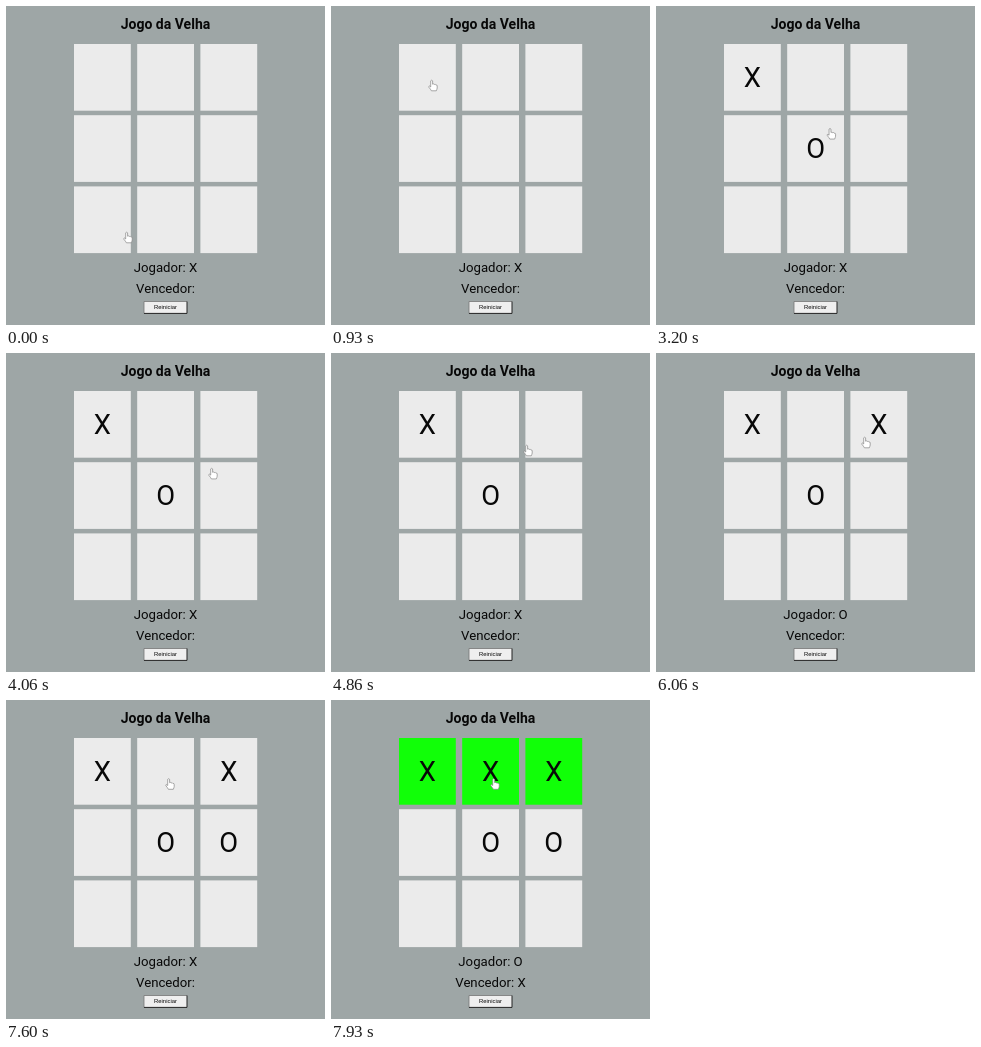
An HTML page for the animation above (8 s loop, 319 by 319 pixels).

```html
<!DOCTYPE html>
<html lang="pt-BR">
<head>
<meta charset="utf-8">
<title>Jogo da Velha</title>
<style>
  html, body { margin: 0; width: 100%; height: 100%; overflow: hidden; background: #9ea6a6; }
  svg { display: block; width: 100%; height: 100%; }
  text { font-family: Roboto, sans-serif; text-anchor: middle; fill: #080808; }
  .title { font-size: 14px; font-weight: 700; }
  .label { font-size: 13.2px; }
  .mark { font-size: 27.4px; }
  .button-text { font: 5.9px "Liberation Sans", Arial, sans-serif; }
</style>
</head>
<body>
<svg viewBox="0 0 319 319">
  <text class="title" x="159.5" y="22.9">Jogo da Velha</text>
  <g id="board"></g>
  <text class="label" id="player" x="159.5" y="266.4"></text>
  <text class="label" id="winner" x="159.5" y="287.2"></text>
  <rect x="138" y="295.5" width="43" height="12" fill="#efefef"/>
  <path d="M138 307.4V295.5H181" fill="none" stroke="#777" stroke-width=".8"/>
  <path d="M138 307.4H181V295.5" fill="none" stroke="#222" stroke-width="1"/>
  <text class="button-text" x="159.5" y="303.1">Reiniciar</text>
  <path id="hand" fill="#fff" stroke="#858585" stroke-width=".7" stroke-linejoin="round"
    d="M-1.3 .8Q-.3-.4.6.8V4.2Q1.6 3.5 2.3 4.4Q3.3 3.9 3.8 4.9Q5.2 4.6 5.2 6V8Q5 9.3 4.3 10.8H-.6Q-1.4 9.2-3 7.4Q-3.6 6.1-2.4 6L-1.3 7Z"/>
  <circle id="ring" fill="none" stroke="#e6565a" stroke-width="1.1"/>
</svg>
<script>
const LOOP = 8000, STEP = 200 / 3;
const RING_STEPS = 4;
const grid = { x: 68, y: 38, dx: 63.2, dy: 71.2, width: 56.8, height: 66.7 };

// Pointer glides between steps `from` and `to`; `press` is the step of a click there
const home = { x: 121, y: 226 };
const moves = [
  { from: 0, to: 10, x: 101, y: 74, press: 15 },
  { from: 24, to: 30, x: 154, y: 139, press: 31 },
  { from: 47, to: 52.5, x: 199, y: 102 },
  { from: 59, to: 63, x: 207, y: 117 },
  { from: 65, to: 73, x: 196, y: 92 },
  { from: 74, to: 78, x: 209, y: 84, press: 81 },
  { from: 91, to: 97, x: 216, y: 138, press: 98 },
  { from: 104, to: 113, x: 163, y: 78.5, press: 115 }
];
const clicks = moves.filter(m => m.press);

const get = id => document.getElementById(id);
const [board, player, winner, hand, ring] = ["board", "player", "winner", "hand", "ring"].map(get);

function add(name, attrs) {
  const node = document.createElementNS("http://www.w3.org/2000/svg", name);
  for (const key in attrs) node.setAttribute(key, attrs[key]);
  return board.appendChild(node);
}

const cells = Array.from({ length: 9 }, (_, i) => {
  const { width, height } = grid;
  const x = grid.x + grid.dx * (i % 3), y = grid.y + grid.dy * Math.floor(i / 3);
  return {
    box: add("rect", { x, y, width, height }),
    mark: add("text", { x: x + width / 2, y: y + 42.6, class: "mark" })
  };
});

const cellAt = ({ x, y }) =>
  3 * Math.floor((y - grid.y) / grid.dy) + Math.floor((x - grid.x) / grid.dx);
const easeOut = u => 1 - (1 - u) ** 3;

function pointAt(step) {
  return moves.reduce((p, m) => {
    const u = Math.min(1, Math.max(0, (step - m.from) / (m.to - m.from)));
    const e = easeOut(u);
    return { x: p.x + (m.x - p.x) * e, y: p.y + (m.y - p.y) * e };
  }, home);
}

function draw(step) {
  const { x, y } = pointAt(step);
  hand.setAttribute("transform", `translate(${x} ${y})`);

  const click = clicks.find(c => step >= c.press && step < c.press + RING_STEPS);
  const age = click ? step - click.press : 0;
  ring.setAttribute("visibility", click ? "visible" : "hidden");
  ring.setAttribute("cx", x);
  ring.setAttribute("cy", y + .6);
  ring.setAttribute("r", 14 - 1.4 * age);

  // A mark lands on the last step of its ring
  const placed = clicks.filter(c => step >= c.press + RING_STEPS - 1);
  const marks = Array(9).fill("");
  placed.forEach((c, turn) => marks[cellAt(c)] = "XO"[turn % 2]);
  const wonRow = [0, 1, 2].find(r => /XXX|OOO/.test(marks.slice(3 * r, 3 * r + 3).join("")));

  cells.forEach(({ box, mark }, i) => {
    mark.textContent = marks[i];
    box.setAttribute("fill", Math.floor(i / 3) === wonRow ? "#11ff08" : "#ebebeb");
  });
  player.textContent = "Jogador: " + "XO"[placed.length % 2];
  winner.textContent = "Vencedor:" + (wonRow === undefined ? "" : " " + marks[3 * wonRow]);
}

let last = -1;
function tick() {
  const ms = Math.floor(performance.now() % LOOP / 10) * 10;
  const step = Math.floor((ms + 9.99) / STEP);
  if (step !== last) draw(last = step);
  requestAnimationFrame(tick);
}
tick();
</script>
</body>
</html>
```
